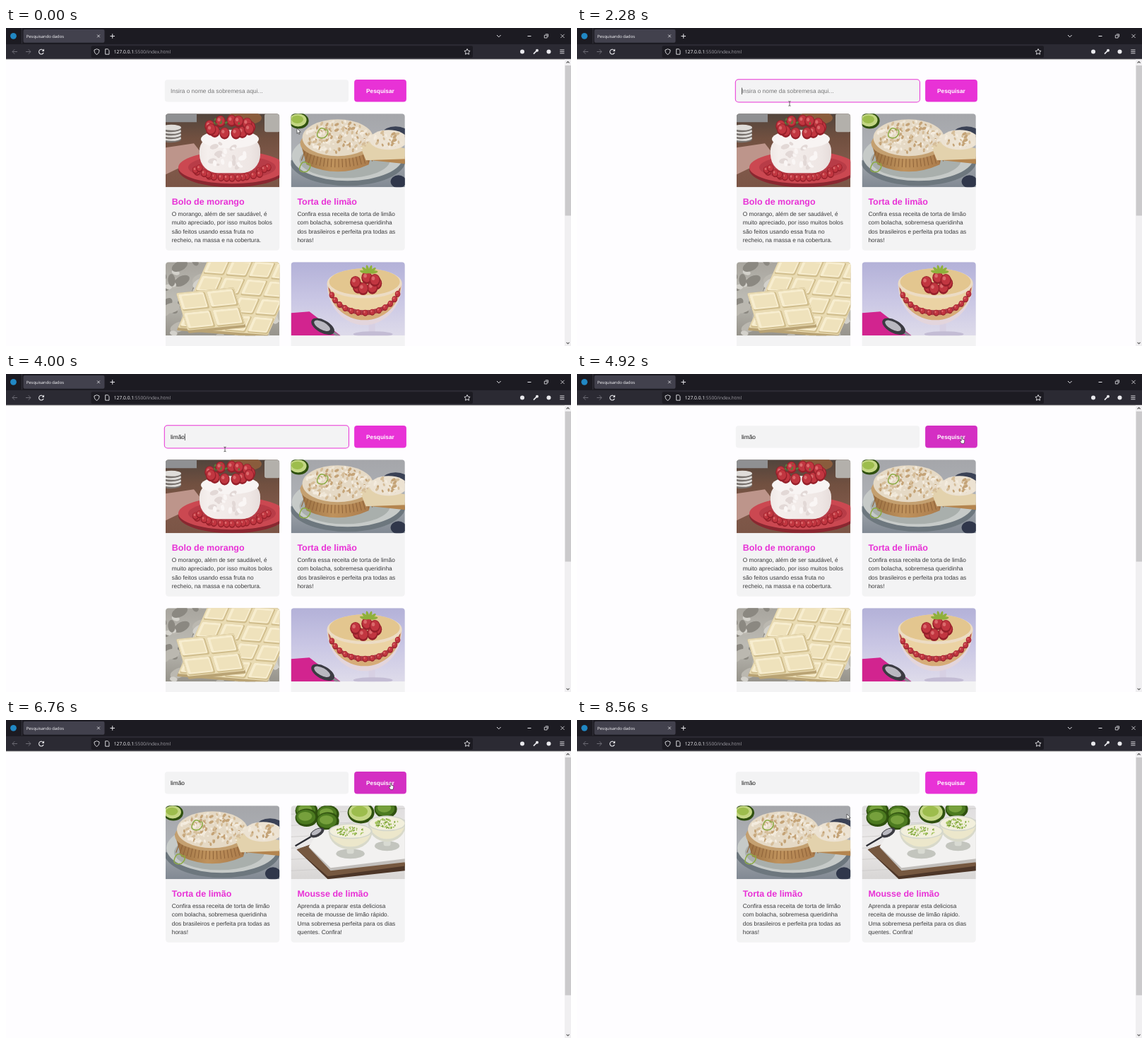
An HTML page with a canvas for the animation above (8.6 s loop, 800 by 450 pixels).

```html
<!DOCTYPE html>
<html lang="pt-BR">
<head>
<meta charset="utf-8">
<title>Pesquisando dados</title>
<style>
html, body { margin: 0; width: 100%; height: 100%; overflow: hidden; background: #fefdff; }
canvas { display: block; width: 800px; height: 450px; }
</style>
</head>
<body>
<canvas id="stage"></canvas>
<script>
const canvas = document.getElementById('stage');
const ctx = canvas.getContext('2d');
const ratio = window.devicePixelRatio || 1;
canvas.width = 800 * ratio;
canvas.height = 450 * ratio;

const LOOP = 8600;
const SANS = '"Liberation Sans", Arial, sans-serif';
const UI = '"Open Sans", "Noto Sans", sans-serif';
const PINK = '#e832d6', FIELD = '#f3f3f4', ICON = '#e9e9ed';
const BODY = 16 / 1.92;
const PHOTO = { w: 161.2, h: 104 };

// Drawing helpers
function rect(color, x, y, w, h, r = 0) {
  ctx.fillStyle = color;
  ctx.beginPath();
  ctx.roundRect(x, y, w, h, r);
  ctx.fill();
}
function oval(color, x, y, rx, ry = rx, turn = 0, to = Math.PI * 2) {
  ctx.fillStyle = color;
  ctx.beginPath();
  ctx.ellipse(x, y, rx, ry, turn, 0, to);
  ctx.fill();
}
const bowl = (color, x, y, rx, ry) => oval(color, x, y, rx, ry, 0, Math.PI);
function fill(color, path) {
  ctx.fillStyle = color;
  ctx.fill(new Path2D(path));
}
function stroke(color, width, path) {
  ctx.strokeStyle = color;
  ctx.lineWidth = width;
  ctx.stroke(new Path2D(path));
}
function fade(x, y, ...colors) {
  const g = ctx.createLinearGradient(0, 0, x, y);
  colors.forEach((c, i) => g.addColorStop(i / (colors.length - 1), c));
  return g;
}
function text(str, x, y, color, size, font = SANS, weight = 400) {
  ctx.font = `${weight} ${size}px ${font}`;
  ctx.fillStyle = color;
  ctx.fillText(str, x, y);
  return ctx.measureText(str).width;
}
function random(seed) {
  return () => (seed = (seed * 16807) % 2147483647) / 2147483647;
}
// Spread marks evenly over an ellipse
function scatter(seed, count, x, y, rx, ry, mark) {
  const rnd = random(seed * 7919);
  for (let i = 0; i < count; i++) {
    const a = rnd() * Math.PI * 2, d = Math.sqrt(rnd());
    mark(x + Math.cos(a) * d * rx, y + Math.sin(a) * d * ry, rnd(), i);
  }
}
const dab = (colors, size) => (x, y, k, i) =>
  oval(colors[i % colors.length], x, y, size * (0.6 + k), size * (0.4 + k / 2), k * 3);
const backdrop = (...colors) => rect(fade(0, PHOTO.h, ...colors), 0, 0, PHOTO.w, PHOTO.h);

function berry(x, y, r) {
  oval('#96202a', x, y, r * 0.85, r);
  oval('#c13640', x, y - r * 0.1, r * 0.7, r * 0.8);
  oval('#db6a6c', x - r * 0.25, y - r * 0.3, r * 0.25, r * 0.3);
}
function lime(x, y, r, cut) {
  oval('#2f500f', x, y, r, r * 0.8);
  oval(cut ? '#c3d683' : '#4c7a20', x - 1, y - 1, r * 0.85, r * 0.65);
  oval(cut ? '#9dbd4d' : '#76a03c', x - 2, y - 2, r * 0.6, r * 0.4);
}
function spoon(x, y, r, turn) {
  oval('#3b3b42', x, y, r, r / 2, turn);
  oval('#b9b8c0', x - 1, y - 1, r * 0.7, r * 0.3, turn);
}

// Photos
function cakePhoto() {
  backdrop('#51443c', '#715040', '#80594a', '#7b5546');
  rect('#8f9092', 0, 0, 44, 12);
  rect('#b3b0ab', 140, 0, 22, 26, 3);
  oval('#8a5c3c', 112, 6, 24, 10);
  fill('#bd958b', 'M0 48L40 42L54 60L0 86Z');
  for (let y = 36; y > 18; y -= 5) {
    oval('#77716d', 8, y, 14, 5);
    oval('#dfdcd9', 8, y - 1.5, 14, 4);
  }
  oval('#8a2730', 94, 79, 76, 25);
  oval('#cb4851', 94, 76, 76, 23);
  oval('#b83c47', 94, 76, 62, 17);
  rect(fade(180, 0, '#d8cdca', '#f5efed', '#eee6e4', '#cbbebc'), 48, 32, 86, 52, [20, 20, 26, 26]);
  oval('#f8f4f3', 91, 36, 41, 13);
  scatter(4, 22, 91, 58, 38, 18, dab(['#faf6f5', '#e2d8d6'], 4));
  for (let a = 0; a < 3.2; a += 0.17) {
    const wide = 48 + 5 * Math.cos(a * 9);
    berry(92 + Math.cos(a) * wide, 76 + Math.sin(a) * 15, 5.5);
  }
  for (let i = 0; i < 12; i++) {
    const a = i * 2.4;
    berry(91 + Math.cos(a) * 29, 19 + Math.sin(a) * 9, 8.5);
  }
  scatter(8, 9, 91, 10, 28, 6, dab(['#587f3a'], 1.6));
}

function tartPhoto() {
  backdrop('#a5a6aa', '#adb0b5', '#818993');
  oval('#3a4155', 148, 27, 18, 9);
  lime(11, 10, 14, true);
  bowl('#6d777e', 80, 66, 82, 36);
  oval('#c6cac8', 80, 60, 79, 35);
  oval('#a9afac', 76, 66, 64, 25);
  fill(fade(118, 0, '#8e6539', '#bf925c', '#a9794a'), 'M13 40L22 72Q66 92 110 72L118 40Z');
  ctx.setLineDash([1, 4]);
  stroke('#8d6239', 22, 'M18 56Q66 74 114 56');
  ctx.setLineDash([]);
  oval('#c4a070', 66, 42, 53, 22);
  oval('#e5d9c5', 66, 34, 50, 26);
  fill('#b4854f', 'M112 52L162 61V71L114 66Z');
  fill('#e3d2ad', 'M98 46L112 40L162 49V64L106 66Z');
  oval('#ece2d2', 138, 37, 27, 14);
  const toast = dab(['#f4ecdf', '#d5bd99', '#efe6d6', '#c4a377'], 2.3);
  scatter(31, 150, 66, 33, 47, 23, toast);
  scatter(17, 40, 138, 36, 23, 11, toast);
  for (const [x, y] of [[44, 28], [19, 76]]) {
    stroke('#8cab45', 1.5, `M${x + 6} ${y - 4}q-8 -8 -12 2t9 8q8 -6 4 -12`);
  }
  oval('#30374b', 152, 96, 11, 9);
}

function bar(x, y, turn, lean, cols, rows, w, h) {
  ctx.save();
  ctx.translate(x, y);
  ctx.rotate(turn);
  ctx.transform(1, 0, lean, 1, 0, 0);
  rect('#b9a374', 0, 0, cols * w, rows * h + 4, 2);
  rect('#e9dbb3', 0, 0, cols * w, rows * h, 2);
  for (let i = 0; i < cols * rows; i++) {
    const tx = i % cols * w, ty = Math.floor(i / cols) * h;
    rect('#d0bd8c', tx + 2, ty + 2, w - 3, h - 3, 2);
    rect('#f7edcf', tx + 2, ty + 2, w - 5, h - 5, 2);
    rect('#efe2bc', tx + 6, ty + 5, w - 11, h - 10, 1);
  }
  ctx.restore();
}
function chocolatePhoto() {
  backdrop('#a8a59e', '#bdbbb4', '#96938b');
  scatter(77, 80, 80, 52, 100, 70, dab(['#d3d1cb', '#8b8881', '#bbb8b0'], 8));
  bar(62, -8, 0.08, -0.35, 4, 4, 32, 26);
  bar(15, 44, -0.1, 0.2, 2, 2, 41, 27);
}

function triflePhoto() {
  backdrop('#b3b1d8', '#c9c6e4', '#dedbea');
  fill('#d2248f', 'M0 72L26 70L70 104H0Z');
  stroke('#8b8591', 4, 'M55 96L74 110');
  spoon(45, 91, 18, 0.5);
  rect('#d7d0e3', 110, 86, 9, 18);
  oval('#c3bcd4', 116, 102, 28, 4);
  // Glass and layers, from the outside in
  const layers = ['#e3d5dc', '#d6ac78', '#ad3a47', '#ebd3a4'];
  layers.forEach((c, i) => bowl(c, 104, 31, 53 - i, 58 - i * 7));
  for (let a = 0.35; a < 2.9; a += 0.2) {
    berry(104 + Math.cos(a) * 50, 31 + Math.sin(a) * 41, 4.5);
  }
  oval('#ecdcc4', 104, 30, 53, 21);
  oval('#e3c68f', 104, 28, 50, 19);
  for (let i = 0; i < 7; i++) berry(106 + Math.cos(i * 2.4) * 15, 30 + Math.sin(i * 2.4) * 8, 9);
  for (let a = -2.9; a < 0; a += 0.55) oval('#8fb03c', 110 + Math.cos(a) * 7, 15 + Math.sin(a) * 5, 6, 2, a);
}

function moussePhoto() {
  backdrop('#dfddde', '#eceaea', '#d8d6d5');
  for (let y = 12; y < PHOTO.h; y += 16) stroke('#cbc8c7', 0.8, `M0 ${y}L162 ${y - 8}`);
  for (let i = 0; i < 4; i++) lime(22 + i % 2 * 30, 7 + i * 5, 16);
  lime(134, 5, 16);
  lime(99, 10, 19, true);
  fill('#4d3628', 'M8 62L36 52L162 82V92L52 104Z');
  fill('#765840', 'M8 62L36 52L162 80V85L52 100Z');
  fill('#c1bebb', 'M25 59L39 36L162 25V80L56 92Z');
  fill('#f2f1f0', 'M25 58L39 35L162 24V75L56 88Z');
  stroke('#2c2d34', 2.4, 'M6 57L28 44');
  spoon(37, 38, 11, -0.5);
  for (const [x, y, r] of [[136, 25, 27], [84, 36, 31]]) {
    oval('#c3c5be', x, y + 32, r * 0.65, 7);
    rect('#d8dad2', x - 5, y + 18, 10, 14, 3);
    bowl('#d8d9ca', x, y, r, 26);
    bowl('#ece7cb', x, y, r - 2, 22);
    oval('#d2d5cb', x, y, r, 11);
    oval('#f2efdc', x, y, r - 2, 9.5);
    scatter(r, 55, x, y, r * 0.65, 7, dab(['#7ba237', '#a5c45d'], 1.2));
  }
}

// Page content
const CARDS = {
  cake: [cakePhoto, 'Bolo de morango', ['O morango, além de ser saudável, é', 'muito apreciado, por isso muitos bolos',
    'são feitos usando essa fruta no', 'recheio, na massa e na cobertura.']],
  tart: [tartPhoto, 'Torta de limão', ['Confira essa receita de torta de limão', 'com bolacha, sobremesa queridinha',
    'dos brasileiros e perfeita pra todas as', 'horas!']],
  chocolate: [chocolatePhoto, '', []],
  trifle: [triflePhoto, '', []],
  mousse: [moussePhoto, 'Mousse de limão', ['Aprenda a preparar esta deliciosa', 'receita de mousse de limão rápido.',
    'Uma sobremesa perfeita para os dias', 'quentes. Confira!']],
};
const ALL = ['cake', 'tart', 'chocolate', 'trifle'];
const FOUND = ['tart', 'mousse'];

function card(name, i) {
  const [photo, title, lines] = CARDS[name];
  ctx.save();
  ctx.translate(226 + (i % 2) * 177.6, 121.3 + (i >> 1) * 210);
  rect(FIELD, 0, 0, PHOTO.w, 193.5, 4.2);
  text(title, 8.8, 128.4, PINK, 12.5, SANS, 700);
  lines.forEach((s, k) => text(s, 8.8, 144.3 + k * 12.5, '#3b3b3c', BODY));
  ctx.beginPath();
  ctx.roundRect(0, 0, PHOTO.w, PHOTO.h, [4.2, 4.2, 0, 0]);
  ctx.clip();
  photo();
  ctx.restore();
}

function cross(x, y, r) {
  stroke(ICON, 0.8, `M${x - r} ${y - r}l${2 * r} ${2 * r}m0 ${-2 * r}l${-2 * r} ${2 * r}`);
}
function arrow(x, dir) {
  stroke('#6c6b74', 1, `M${x - 3.5 * dir} 33.5h${7 * dir}m${-3.3 * dir} -3.3l${3.3 * dir} 3.3l${-3.3 * dir} 3.3`);
}
function star(x, y, r) {
  let path = '';
  for (let i = 0; i < 10; i++) {
    const a = i * Math.PI / 5 - Math.PI / 2, d = i % 2 ? r / 2 : r;
    path += `${i ? 'L' : 'M'}${x + Math.cos(a) * d} ${y + Math.sin(a) * d}`;
  }
  stroke(ICON, 0.9, path + 'Z');
}

function browser() {
  rect('#1c1b22', 0, 0, 800, 22.9);
  rect('#2b2a33', 0, 22.9, 800, 20.8);
  rect('#0c0c0d', 0, 43.7, 800, 0.5);
  rect('#3a3942', 22, 0, 0.8, 22);
  rect('#42414d', 24.5, 2.1, 115, 18.7, 2);
  rect('#1c1b22', 120.5, 25.3, 540.5, 16.6, 2);
  oval('#2188c4', 10.5, 11.3, 4.4);
  text('Pesquisando dados', 28.8, 13.9, '#fbfbfe', 5.85, UI);
  const w = text('127.0.0.1', 152.8, 36.2, '#fbfbfe', 6.7, UI);
  text(':5500/index.html', 152.8 + w, 36.2, '#a09fa6', 6.6, UI);

  cross(131, 11.4, 1.9);
  cross(788, 11.4, 2.6);
  stroke(ICON, 1, 'M147.5 11.5h6.5m-3.25 -3.25v6.5M695 10l2.8 2.8l2.8 -2.8M738.5 11.5h5');
  stroke(ICON, 0.8, 'M762.3 10.2h3.8v3.8h-3.8zm1.5 -1.4h3.8v3.8');
  arrow(12.5, -1);
  arrow(31.5, 1);
  stroke(ICON, 1.1, 'M53 32A3.4 3.4 0 1 0 53.2 34.8');
  fill(ICON, 'M54 29.5v3.5h-3.3z');
  stroke(ICON, 0.9, 'M128.5 29.7l3.5 1.3q.3 4.5 -3.5 6.5q-3.8 -2 -3.5 -6.5zM140.7 29.8h3.5l1.8 1.8v5.6h-5.3z');
  star(653, 33.8, 4.3);
  stroke(ICON, 1.8, 'M747 36.7l4.5 -4.7');
  oval(ICON, 752, 31.7, 2);
  for (const x of [731, 768.5]) oval(ICON, x, 33.5, 3);
  for (let y = 31; y < 37; y += 2.4) stroke(ICON, 0.9, `M784.3 ${y}h6.2`);
}

function scrollbar(end) {
  rect('#f0eff1', 791, 44.2, 9, 406);
  rect('#cbcacc', 791.6, 53, 8.4, end - 53);
  stroke('#555', 1.1, 'M793.6 49.5l2 -2l2 2M793.6 444.8l2 2l2 -2');
}

// Timeline in ms
const FOCUS = 1800, BLUR = 4860, FILTER = 5000;
const KEYS = [2780, 2920, 3060, 3320, 3520];
const STOPS = [
  { x: 412, y: 142, until: 1260 },
  { x: 301, y: 107, from: 1740, until: 3920 },
  { x: 545, y: 93, from: 4620, until: 7260 },
  { x: 382, y: 133, from: 7900, until: LOOP },
];
const ease = p => p * p * (3 - 2 * p);

function pointer(t) {
  const i = STOPS.findIndex(s => t < s.until);
  const b = STOPS[i], a = STOPS[i - 1];
  if (!a || t >= b.from) return [b.x, b.y];
  const p = ease((t - a.until) / (b.from - a.until));
  return [a.x + (b.x - a.x) * p, a.y + (b.y - a.y) * p];
}

function form(t, hover) {
  const focused = t >= FOCUS && t < BLUR;
  if (focused) rect(PINK, 223.8, 72.3, 262.2, 33.2, 5);
  rect(FIELD, 224.8, 73.3, 260.2, 31.2, 4);
  const typed = KEYS.filter(k => t >= k).length;
  const value = 'limão'.slice(0, typed);
  const width = text(value, 233, 92, '#161616', BODY);
  if (!value) text('Insira o nome da sobremesa aqui...', 233, 92, '#777778', BODY);
  const since = t - (typed ? KEYS[typed - 1] : FOCUS);
  if (focused && since % 1000 < 500) rect('#222', 233 + width, 84.5, 0.7, 9.5);
  rect(hover ? '#d42fc3' : PINK, 493.1, 73, 73.8, 31.6, 4);
  text('Pesquisar', 510, 91.9, '#fff', BODY, SANS, 700);
}

function drawPointer(x, y, inField, hover) {
  ctx.save();
  ctx.translate(x, y);
  if (inField) {
    stroke('#444', 0.8, 'M-1.6 -3.3L0 -2.8L1.6 -3.3M0 -3V3M-1.6 3.3L0 2.8L1.6 3.3');
  } else {
    const path = hover
      ? 'M-.8 -3.5q.8 -.9 1.5 0v2.8l2.8 .9q.5 .3 .3 1.8l-.9 3.5h-3.4l-2.2 -3.5q-.1 -1.2 1.9 -.4z'
      : 'M0 0v7.4l1.7 -1.6l1.1 2.6l1.2 -.5l-1.1 -2.5h2.3z';
    fill('#fff', path);
    stroke('#222', 0.6, path);
  }
  ctx.restore();
}

function draw(now) {
  const t = now % LOOP;
  const [x, y] = pointer(t);
  const inField = x > 225 && x < 485 && y < 110;
  const hover = x > 493 && x < 567 && y < 105;
  const filtered = t >= FILTER;
  ctx.setTransform(ratio, 0, 0, ratio, 0, 0);
  ctx.textRendering = 'geometricPrecision';
  rect('#fefdff', 0, 0, 800, 450);
  (filtered ? FOUND : ALL).forEach(card);
  form(t, hover);
  browser();
  scrollbar(filtered ? 389.5 : 265.5);
  drawPointer(x, y, inField, hover);
}

const start = performance.now();
function tick() {
  draw(performance.now() - start);
  requestAnimationFrame(tick);
}
tick();
</script>
</body>
</html>
```
